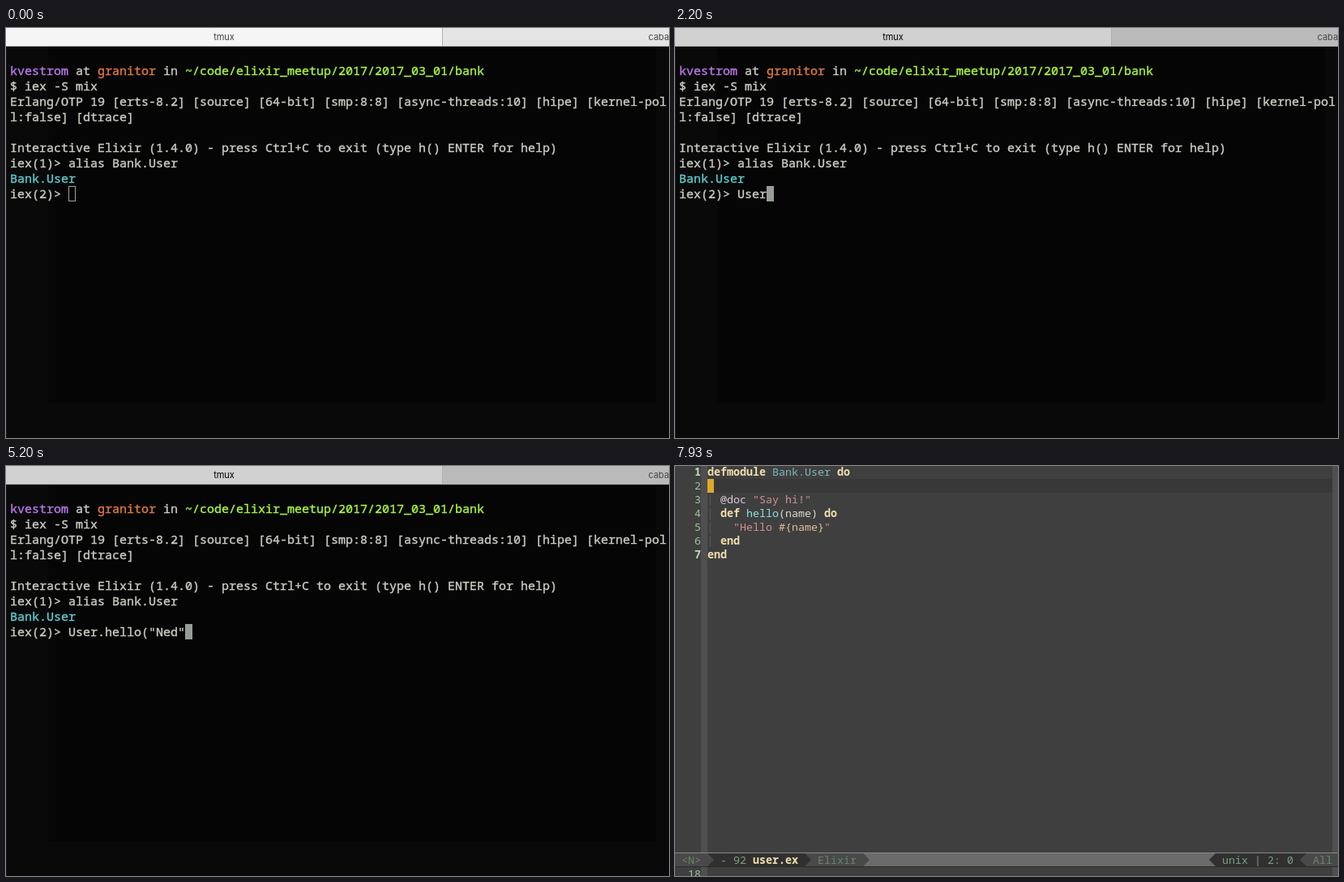
Write an HTML page that moves like this. It is 818 px wide and 506 px high and loops after 8000 ms.

```html
<!DOCTYPE html>
<html lang="en">
<head>
<meta charset="utf-8">
<title>Terminal session</title>
<style>
  html, body { margin: 0; width: 100%; height: 100%; overflow: hidden; background: #050505; }
  svg { display: block; width: 818px; height: 506px; }
  text { white-space: pre; font-variant-ligatures: none; }
  text, tspan { fill: currentColor; }
  #shell text { font: 400 15px "Noto Sans Mono", monospace; color: #cbcbc3; }
  #shell text, #shell tspan { stroke: currentColor; stroke-width: .4px; }
  #shell .tab { font: 400 11px Inter, sans-serif; color: #484848; }
  #shell .tab, #shell .tab tspan { stroke: none; }
  #editor text { font: 400 13.333px "Noto Sans Mono", monospace; color: #dcdccc; }
</style>
</head>
<body>
<svg id="stage" viewBox="0 0 818 506"></svg>
<script>
const LOOP = 8000, FOCUS = 70, ENTER = 6200, EDITOR = 7930;
const INPUT = 'User.hello("Ned")';
// [start, end, characters typed by the end]
const TYPING = [[1500, 3300, 11], [3750, 5130, 16], [5450, 5530, 17]];

const esc = s => s.replace(/&/g, '&amp;').replace(/</g, '&lt;');
const rect = (x, y, w, h, fill, more = '') =>
  `<rect x="${x}" y="${y}" width="${w}" height="${h}" fill="${fill}" ${more}/>`;
const poly = (points, fill) => `<polygon points="${points}" fill="${fill}"/>`;
const span = ([s, color, weight]) =>
  `<tspan style="${color ? `color:${color};` : ''}${weight ? `font-weight:${weight}` : ''}">${esc(s)}</tspan>`;
const line = (x, y, parts, more = '') =>
  `<text x="${x}" y="${y}" ${more}>${parts.map(span).join('')}</text>`;
const rowY = i => 58 + 19 * i;

function shell() {
  const rows = [
    [['kvestrom', '#b877e6'], [' at '], ['granitor', '#df7a42'], [' in '],
     ['~/code/elixir_meetup/2017/2017_03_01/bank', '#a8f443']],
    [['$ iex -S mix']],
    [['Erlang/OTP 19 [erts-8.2] [source] [64-bit] [smp:8:8] [async-threads:10] [hipe] [kernel-pol']],
    [['l:false] [dtrace]']],
    [],
    [['Interactive Elixir (1.4.0) - press Ctrl+C to exit (type h() ENTER for help)']],
    [['iex(1)> alias Bank.User']],
    [['Bank.User', '#61c9cd']]
  ];
  return rect(0, 0, 818, 506, '#090909') + rect(52, 23, 750, 440, '#050505') +
    rect(0, 23, 1, 483, '#191919') +
    rect(0, 0, 538, 23, '#f5f5f5', 'id="active"') +
    rect(538, 0, 280, 23, '#e5e5e5', 'id="idle"') +
    rect(538, 0, 1, 23, '#b0b0b0') + rect(0, 22, 818, 1, '#a8a8a8') +
    line(269, 15, [['tmux']], 'class="tab" id="title" text-anchor="middle"') +
    line(792.5, 15, [['caba']], 'class="tab"') +
    rows.map((parts, i) => line(5, rowY(i), parts)).join('') +
    line(5, rowY(8), [['iex(2)> ']], 'id="prompt"') +
    `<g id="reply">${line(5, rowY(9), [['"Hello Ned"', '#4fd145']])}${line(5, rowY(10), [['iex(3)> ']])}</g>` +
    rect(0, 0, 9, 19, '#979c97', 'id="cursor"') +
    rect(77.5, 195.5, 8, 18, 'none', 'id="hollow" stroke="#a0a49c"');
}

function editor() {
  const key = '#f0dfaf', str = '#cc9393', green = '#9fc59f', dim = '#7f9f7f', faint = '#688568';
  const code = [
    [['defmodule', key, 700], [' '], ['Bank.User', '#7cb8bb'], [' '], ['do', key, 700]],
    [],
    [['  '], ['@doc', '#dcc8dc'], [' '], ['"Say hi!"', str]],
    [['  '], ['def', key, 700], [' '], ['hello', '#93e0e3'], ['(name) '], ['do', key, 700]],
    [['    '], ['"Hello ', str], ['#{name}', '#e3bf98'], ['"', str]],
    [['  '], ['end', key, 700]],
    [['end', key, 700]]
  ];
  const lines = code.map((parts, i) => {
    const y = 12 + 17 * i, bold = i === 0 || i === 6;
    return line(24, y, [[String(i + 1), bold ? '#bfd9b5' : green, bold ? 700 : 400]]) + line(40, y, parts);
  }).join('');
  const guides = [2, 3, 4, 5].map(i => rect(43, 17 * i + 1, 1, 14, '#595959')).join('');
  const bar = rect(0, 477, 818, 18, '#6b6b6b') +
    poly('0,478 232,478 240,486 232,494 0,494', '#494949') +
    poly('40,478 160,478 168,486 160,494 40,494 48,486', '#303030') +
    poly('818,478 667,478 659,486 667,494 818,494', '#303030') +
    poly('818,478 779,478 771,486 779,494 818,494', '#494949') +
    rect(0, 477, 818, 1, '#888') + rect(0, 494, 818, 1, '#2b2b2b') +
    line(8, 491, [['<N>', faint]]) +
    line(56, 491, [['- 92 ', dim], ['user.ex', key, 700]]) +
    line(176, 491, [['Elixir', faint]]) +
    line(675, 491, [['unix | 2: 0', dim]]) +
    line(787, 491, [['All', faint]]);
  return rect(0, 0, 818, 506, '#3f3f3f') +
    rect(40, 16, 771, 17, '#383838') +
    rect(32, 0, 8, 506, '#4f4f4f') + rect(811, 0, 7, 506, '#4f4f4f') +
    guides + rect(40, 16, 8, 17, '#e0a92b') + lines + bar +
    line(16, 508, [['18', green]]);
}

const stage = document.getElementById('stage');
stage.innerHTML = `<g id="shell">${shell()}</g><g id="editor">${editor()}</g>`;
const $ = id => document.getElementById(id);
const show = (id, on) => $(id).setAttribute('visibility', on ? 'visible' : 'hidden');

function typedCount(t) {
  let count = 0;
  for (const [start, end, total] of TYPING) {
    if (t < start) break;
    const p = Math.min(1, (t - start) / (end - start));
    count += Math.floor((total - count) * p);
  }
  return count;
}

function draw(t) {
  const focused = t >= FOCUS, done = t >= ENTER, edit = t >= EDITOR;
  const n = typedCount(t);
  $('shell').style.display = edit ? 'none' : '';
  $('editor').style.display = edit ? '' : 'none';
  $('active').setAttribute('fill', focused ? '#d1d1d1' : '#f5f5f5');
  $('idle').setAttribute('fill', focused ? '#bababa' : '#e5e5e5');
  $('title').style.color = focused ? '#000' : '#404040';
  $('prompt').firstChild.textContent = 'iex(2)> ' + INPUT.slice(0, n);
  show('reply', done);
  show('cursor', focused);
  show('hollow', !focused);
  $('cursor').setAttribute('x', done ? 77 : 77 + 9 * n);
  $('cursor').setAttribute('y', done ? 233 : 195);
}

const begin = performance.now();
function tick() {
  draw((performance.now() - begin) % LOOP);
  requestAnimationFrame(tick);
}
tick();
</script>
</body>
</html>
```
